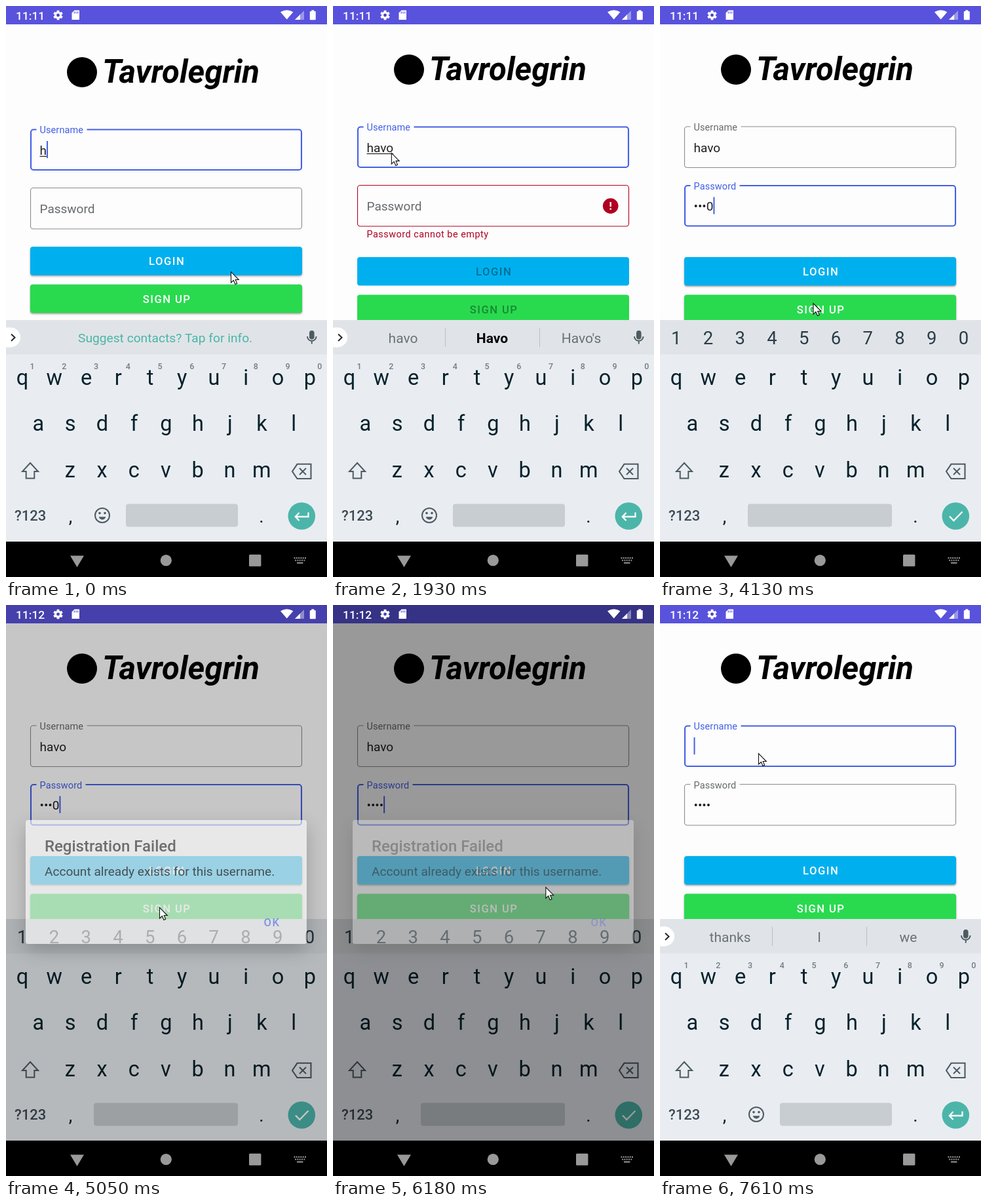
An HTML page with a canvas for the animation above (8 s loop, 490 px wide and 871 px high).

```html
<!DOCTYPE html>
<html lang="en">
<head>
<meta charset="utf-8">
<title>Sign up</title>
<style>
html, body { margin: 0; width: 490px; height: 871px; overflow: hidden; background: #fdfdfd; }
canvas { display: block; }
</style>
</head>
<body>
<canvas id="stage" width="490" height="871"></canvas>
<script>
const ctx = document.getElementById('stage').getContext('2d');
const LOOP = 8000;
const BLUE = '#4460e6', RED = '#b00020', GREY = '#666a6d', INK = '#07222c', ICON = '#4d5b62';

// Timelines: each entry holds from its time until the next one.
const NAME = [[0, 'h'], [120, 'ha'], [270, 'hav'], [345, 'havo'], [7170, 'hav'], [7290, 'ha'], [7410, 'h'], [7610, '']];
const PASS = [[0, ''], [3150, '0'], [3290, '•0'], [3430, '••0'], [3640, '•••0'], [5100, '••••']];
const WORDS = [[0, null], [400, ['havo', 'Havo', "Havo's"]], [7190, ['hav', 'have', 'having']],
  [7310, ['ha', 'has', 'had']], [7430, ['h', 'he', 'how']], [7610, ['thanks', 'I', 'we']]];
const CARET = [[0, 1], [900, 0], [1400, 1], [1900, 0], [2230, 1], [2720, 0], [2950, 1],
  [4165, 0], [4650, 1], [5110, 0], [6110, 1]];
const MOUSE = [[0, 343.5, 405], [1350, 343.5, 405], [1690, 264, 436], [1930, 89.5, 224], [2060, 69, 214],
  [2390, 92, 218], [2570, 92, 218], [2740, 163, 302], [3590, 163, 302], [4130, 234, 453], [4330, 234.5, 461],
  [5310, 234.5, 461], [5400, 290, 448], [5610, 403, 485], [6100, 403, 485], [6180, 325.5, 431],
  [6440, 150.5, 226], [LOOP, 150.5, 226]];

const at = (track, t) => track.reduce((v, [start, value]) => t >= start ? value : v, null);
const ramp = (t, a, b) => Math.min(1, Math.max(0, (t - a) / (b - a)));
const mix = (a, b, p) => a + (b - a) * p;

function mousePos(t) {
  const i = MOUSE.findIndex(k => k[0] > t);
  const [a, x0, y0] = MOUSE[i - 1], [b, x1, y1] = MOUSE[i];
  const p = ramp(t, a, b);
  return [mix(x0, x1, p), mix(y0, y1, p)];
}

function text(s, x, y, size, color, { weight = 400, align = 'left', spacing = 0, style = '' } = {}) {
  ctx.font = `${style} ${weight} ${size}px Roboto, sans-serif`;
  ctx.letterSpacing = spacing + 'px';
  ctx.textAlign = align;
  ctx.fillStyle = color;
  ctx.fillText(s, x, y);
  return ctx.measureText(s).width;
}

function box(x, y, w, h, r, color) {
  ctx.beginPath();
  ctx.roundRect(x, y, w, h, r);
  ctx.fillStyle = color;
  ctx.fill();
}

function disc(x, y, r, color) {
  ctx.beginPath();
  ctx.arc(x, y, r, 0, 7);
  ctx.fillStyle = color;
  ctx.fill();
}

// Polyline from flat coordinate pairs.
function trace(points, close) {
  ctx.beginPath();
  for (let i = 0; i < points.length; i += 2) ctx.lineTo(points[i], points[i + 1]);
  if (close) ctx.closePath();
}
function fillPoly(points, color) { trace(points, true); ctx.fillStyle = color; ctx.fill(); }
function line(points, color, width, close) {
  trace(points, close);
  ctx.strokeStyle = color;
  ctx.lineWidth = width;
  ctx.stroke();
}

function shadowed(color, blur, dy, draw) {
  ctx.save();
  ctx.shadowColor = color;
  ctx.shadowBlur = blur;
  ctx.shadowOffsetY = dy;
  draw();
  ctx.restore();
}

function field(y, { label, labelWidth, value, focus, float, error, caret, underline }) {
  const color = error ? RED : focus ? BLUE : '#8b8b8b';
  const labelColor = error && focus ? RED : focus ? BLUE : GREY;
  const inset = focus ? 1 : 0.5;
  ctx.beginPath();
  ctx.roundRect(37 + inset, y + inset, 415 - 2 * inset, 63.5 - 2 * inset, 4);
  ctx.strokeStyle = color;
  ctx.lineWidth = focus ? 2.1 : 1.1;
  ctx.stroke();
  if (float > 0) {
    const gap = (labelWidth + 10) * float;
    ctx.fillStyle = '#fdfdfd';
    ctx.fillRect(51.5 + labelWidth / 2 - gap / 2, y - 1, gap, 4);
  }
  text(label, 51.5, mix(y + 38.5, y + 6.5, float), mix(19, 14.5, float), labelColor, { spacing: 0.1 * float });
  const base = y + 39.3;
  const width = text(value, 51.5, base, 19, '#202020');
  ctx.fillStyle = '#202020';
  if (underline && value) ctx.fillRect(51.5, base + 2, width, 1.2);
  if (caret) {
    ctx.fillStyle = BLUE;
    ctx.fillRect(51.5 + width, y + 18.5, 2, 26);
  }
}

function button(label, y, color, enabled, press, t, px, py) {
  const shape = () => box(37, y, 415, 43.5, 4, color);
  if (enabled) shadowed('rgba(0,0,0,.38)', 3, 1.5, shape); else shape();
  const age = t - press;
  if (age > 0 && age < 480) {
    ctx.save();
    ctx.beginPath();
    ctx.roundRect(37, y, 415, 43.5, 4);
    ctx.clip();
    disc(px, py, 20 + 330 * ramp(age, 0, 225), `rgba(255,255,255,${0.24 * (1 - ramp(age, 150, 300))})`);
    ctx.restore();
  }
  text(label, 245.6, y + 28, 16.6, enabled ? '#fff' : 'rgba(0,0,0,.38)', { weight: 500, align: 'center', spacing: 1.48 });
}

function form(t) {
  const shifted = t >= 960;
  const dy = shifted ? 0 : 4;
  const error = shifted && t < 3150;
  const onPass = t >= 2950 && t < 6600;
  const caret = at(CARET, t);
  const value = at(PASS, t);

  disc(116, 97 + dy, 23, '#000');
  text('Tavrolegrin', 147, 113 + dy, 49, '#000', { weight: 700, style: 'italic' });

  field(183.5 + dy, { label: 'Username', labelWidth: 67, value: at(NAME, t), focus: !onPass, float: 1,
    caret: !onPass && caret, underline: !onPass });
  field(273 + dy, { label: 'Password', labelWidth: 65, value, focus: onPass, float: ramp(t, 2950, 3117), error,
    caret: onPass && caret });

  if (error) {
    disc(423.7, 305, 11.8, RED);
    ctx.fillStyle = '#fff';
    ctx.fillRect(422.5, 299, 2.4, 7.2);
    ctx.fillRect(422.5, 308.4, 2.4, 2.4);
    const p = ramp(t, 960, 1130);
    ctx.globalAlpha = p;
    text('Password cannot be empty', 51.5, 353 - 5 * (1 - p), 14.4, RED, { spacing: 0.5 });
    ctx.globalAlpha = 1;
  }
  const top = shifted ? 383 : 367.2;
  button('LOGIN', top, '#00b0ee', !error, 890, t, 344, 406);
  button('SIGN UP', top + 57.5, '#29da4f', !error, 4450, t, 235, 462);
}

function keyRow(keys, x, y, size, color, weight) {
  [...keys].forEach((k, i) => text(k, x + 48.75 * i, y, size, color, { align: 'center', weight }));
}

function suggestions(t) {
  disc(7, 505.5, 15, '#fff');
  ctx.fillStyle = '#fff';
  ctx.fillRect(0, 490.5, 8, 30);
  line([8, 500.5, 13.5, 505.8, 8, 511], '#23292c', 2);
  const words = at(WORDS, t);
  if (!words) {
    text('Suggest contacts? Tap for info.', 110, 513, 19.2, '#4bb5a6');
  } else {
    ctx.fillStyle = '#b9bfc3';
    ctx.fillRect(171, 491, 1, 29);
    ctx.fillRect(315, 491, 1, 29);
    words.forEach((w, i) => {
      const main = i === 1 && t < 7610;
      text(w, 107 + 136 * i, 514, 21, main ? '#000' : '#687277', { align: 'center', weight: main ? 700 : 400 });
    });
  }
  box(463, 495, 7.6, 13.5, 3.8, ICON);
  ctx.beginPath();
  ctx.arc(466.8, 504, 6.8, 0, Math.PI);
  ctx.moveTo(466.8, 511);
  ctx.lineTo(466.8, 515.5);
  ctx.strokeStyle = ICON;
  ctx.lineWidth = 1.9;
  ctx.stroke();
}

function keyboard(t) {
  const secret = t >= 3050 && t < 6660;
  ctx.fillStyle = '#e9edf1';
  ctx.fillRect(0, 479, 490, 339);
  ctx.fillStyle = '#e0e4e8';
  ctx.fillRect(0, 479, 490, 52.5);
  if (secret) {
    keyRow('1234567890', 24.7, 516, 27.5, '#2b3d46');
  } else {
    suggestions(t);
    keyRow('1234567890', 40, 554, 12.5, '#747d82', 500);
  }
  keyRow('qwertyuiop', 25, 578, 32.5, INK);
  keyRow('asdfghjkl', 49.3, 647.5, 32.5, INK);
  keyRow('zxcvbnm', 97.7, 718.5, 32.5, INK);

  line([37, 697, 49, 710, 43.3, 710, 43.3, 720.5, 30.7, 720.5, 30.7, 710, 25, 710], ICON, 2, true);
  line([444.5, 698.8, 465.5, 698.8, 465.5, 721, 444.5, 721, 437, 710], ICON, 2.1, true);
  line([448, 705, 458, 715], ICON, 2);
  line([458, 705, 448, 715], ICON, 2);

  text('?123', 13, 785, 22, '#3e4c54', { weight: 500 });
  text(',', 98.5, 788, 28, INK, { align: 'center' });
  text('.', 390, 788, 28, INK, { align: 'center' });
  const left = secret ? 134 : 183;
  box(left, 759.5, 354 - left, 35, 4, '#c8cdd1');
  if (!secret) {
    ctx.beginPath();
    ctx.arc(147, 777, 11, 0, 7);
    ctx.strokeStyle = ICON;
    ctx.lineWidth = 2;
    ctx.stroke();
    disc(143, 773.6, 1.8, ICON);
    disc(151, 773.6, 1.8, ICON);
    ctx.beginPath();
    ctx.arc(147, 778, 5.5, 0.25, Math.PI - 0.25);
    ctx.closePath();
    ctx.fillStyle = ICON;
    ctx.fill();
  }
  disc(451.3, 778, 20.8, '#4cb5aa');
  if (secret) {
    line([442, 778.5, 448.3, 785, 461.5, 771.5], '#fff', 2.3);
  } else {
    line([461.5, 772.5, 461.5, 779, 442.5, 779], '#fff', 2.3);
    line([447.5, 773, 441.8, 779, 447.5, 785], '#fff', 2.3);
  }
}

function statusBar(t) {
  text(t < 4250 ? '11:11' : '11:12', 15, 20.5, 17.4, '#fff', { weight: 500 });
  for (let i = 0; i < 6; i++) {
    const a = i * Math.PI / 3 + Math.PI / 6;
    line([79.5, 14, 79.5 + 7.3 * Math.cos(a), 14 + 7.3 * Math.sin(a)], '#fff', 3.8);
  }
  ctx.beginPath();
  ctx.arc(79.5, 14, 4.1, 0, 7);
  ctx.strokeStyle = '#fff';
  ctx.lineWidth = 2.8;
  ctx.stroke();
  disc(79.5, 14, 2.4, '#4a45b8');
  fillPoly([104.5, 6.5, 112, 6.5, 112, 21, 100.5, 21, 100.5, 10.5], '#fff');
  [104.3, 107, 109.7].forEach(x => line([x, 8.5, x, 11.5], '#5952dc', 1.2));

  ctx.beginPath();
  ctx.moveTo(428.7, 20.5);
  ctx.lineTo(419, 9.3);
  ctx.quadraticCurveTo(428.7, 3, 438.4, 9.3);
  ctx.fillStyle = '#fff';
  ctx.fill();
  fillPoly([455, 7, 455, 21, 441, 21], 'rgba(255,255,255,.4)');
  fillPoly([449, 13, 449, 21, 441, 21], '#fff');
  box(463.8, 8, 9, 13.3, 1, '#fff');
  box(466.3, 6.3, 4, 3, 0, '#fff');
}

function navBar() {
  const c = '#999';
  ctx.fillStyle = '#000';
  ctx.fillRect(0, 817, 490, 54);
  fillPoly([98, 838.5, 119, 838.5, 108.5, 856], c);
  disc(244.3, 845.7, 8.6, c);
  box(371, 836.8, 18.4, 18, 1.5, c);
  for (let r = 0; r < 2; r++)
    for (let i = 0; i < 6 - r; i++) box(439.5 + r * 1.6 + i * 3.3, 841 + r * 3.6, 2, 2, 0, c);
  box(444, 848.5, 9.5, 2, 0, c);
}

function dialog(alpha) {
  ctx.globalAlpha = alpha;
  // The shadow is kept outside the card so it stays translucent while fading.
  ctx.save();
  ctx.beginPath();
  ctx.rect(0, 0, 490, 818);
  ctx.roundRect(30, 328, 429, 189, 4);
  ctx.clip('evenodd');
  shadowed('rgba(0,0,0,.36)', 28, 10, () => box(30, 328, 429, 189, 4, '#fff'));
  ctx.restore();
  box(30, 328, 429, 189, 4, '#fff');
  text('Registration Failed', 59, 375.5, 24, '#202020', { weight: 500 });
  text('OK', 393.5, 489.5, 16.6, BLUE, { weight: 500, spacing: 1.48 });
  // The message stays darker than the card during the fades.
  ctx.globalAlpha = Math.sqrt(alpha);
  text('Account already exists for this username.', 59, 412.5, 19.1, '#2c2c2c');
  ctx.globalAlpha = 1;
}

function pointer(x, y) {
  const shape = [0, 0, 0, 16.5, 3.9, 13, 6.5, 19, 9.2, 17.8, 6.7, 12, 11.8, 12];
  ctx.save();
  ctx.translate(x, y + 0.5);
  fillPoly(shape, '#fff');
  line(shape, '#111', 1.1, true);
  ctx.restore();
}

function render(t) {
  ctx.fillStyle = '#fdfdfd';
  ctx.fillRect(0, 0, 490, 871);
  form(t);
  keyboard(t);
  ctx.fillStyle = '#5952dc';
  ctx.fillRect(0, 0, 490, 28);

  const closing = t >= 6100;
  const dim = closing ? 0.6 * (1 - ramp(t, 6100, 6340)) : 0.6 * ramp(t, 5005, 5130);
  const card = closing ? 1 - ramp(t, 6100, 6220) : ramp(t, 4960, 5110);
  ctx.fillStyle = `rgba(0,0,0,${dim})`;
  ctx.fillRect(0, 0, 490, 818);
  if (card > 0) dialog(card);
  statusBar(t);
  navBar();
  pointer(...mousePos(t));
}

const start = performance.now();
function tick() {
  render((performance.now() - start) % LOOP);
  requestAnimationFrame(tick);
}
tick();
</script>
</body>
</html>
```
